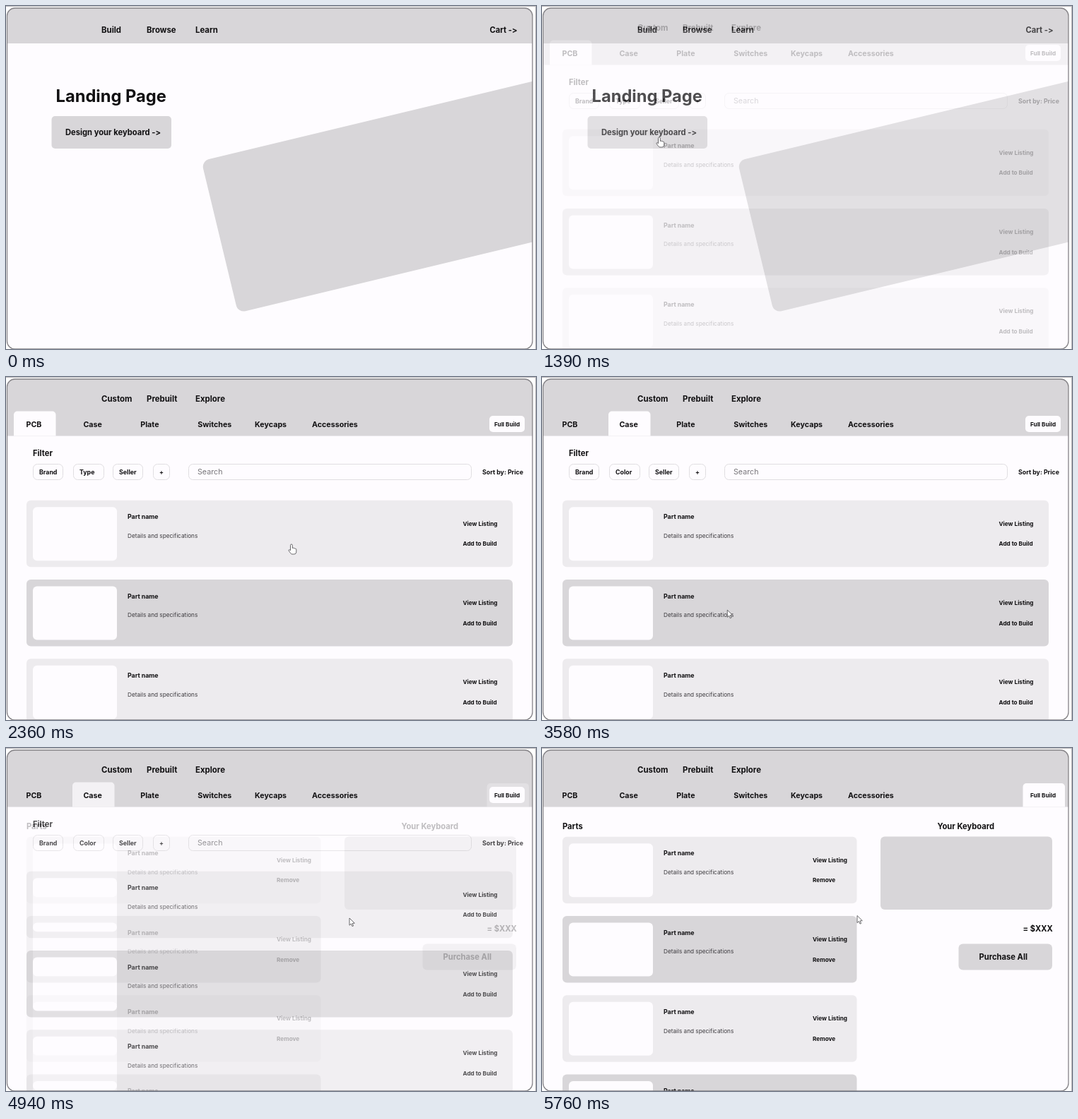
An HTML page with a canvas for the animation above (5850 ms loop, 750 by 486 pixels).

```html
<!DOCTYPE html>
<html lang="en">
<head>
<meta charset="utf-8">
<title>Keyboard builder wireframe</title>
<style>
html, body { margin: 0; width: 100%; height: 100%; overflow: hidden; background: #fff; }
canvas { display: block; width: 750px; height: 486px; }
</style>
</head>
<body>
<canvas id="stage" width="750" height="486"></canvas>
<script>
const W = 750, H = 486, LOOP = 5850;
const PAPER = '#fefcff', GREY = '#d8d6d9', PALE = '#edebee', INK = '#111012';
const LARGE = 11.2, MEDIUM = 8.8, SMALL = 8.2;
const stage = document.getElementById('stage').getContext('2d');

function box(c, x, y, w, h, r, fill, line) {
  c.beginPath();
  c.roundRect(x, y, w, h, r);
  if (fill) { c.fillStyle = fill; c.fill(); }
  if (line) { c.strokeStyle = line; c.lineWidth = 1; c.stroke(); }
}

function text(c, str, x, y, size = LARGE, weight = 700, color = INK) {
  c.font = `${weight} ${size}px Inter, sans-serif`;
  c.fillStyle = color;
  // Drawing ">" on its own keeps "->" from turning into an arrow ligature.
  const arrow = str.endsWith('->');
  const main = arrow ? str.slice(0, -1) : str;
  c.fillText(main, x, y);
  if (arrow) c.fillText('>', x + c.measureText(main).width, y);
}

function outline(c) {
  c.beginPath();
  c.roundRect(1.5, 3, 743.5, 483, 11);
}

function makePage(draw) {
  const canvas = document.createElement('canvas');
  canvas.width = W;
  canvas.height = H;
  const c = canvas.getContext('2d');
  box(c, 0, 0, W, H, 0, '#b9b7ba');
  box(c, 0, 1, W - 1, H - 1, 0, '#fff');
  c.save();
  outline(c);
  c.clip();
  box(c, 0, 0, W, H, 0, PAPER);
  draw(c);
  c.restore();
  outline(c);
  c.strokeStyle = '#858387';
  c.lineWidth = 1.3;
  c.stroke();
  return canvas;
}

function nav(c, names, y) {
  names.forEach((name, i) => text(c, name, 135 + i * 64 + (i === 2 ? 5 : 0), y, 11.4));
}

function landing(c) {
  box(c, 0, 0, W, 53, 0, GREY);
  nav(c, ['Build', 'Browse', 'Learn'], 37.5);
  text(c, 'Cart ->', 684.5, 37.5);
  text(c, 'Landing Page', 70.5, 136, 23.7);
  box(c, 64.5, 156, 169.5, 46, 5, GREY);
  text(c, 'Design your keyboard ->', 84, 183);
  c.save();
  c.translate(276.5, 219.7);
  c.rotate(-Math.atan(0.241));
  box(c, 0, 0, 620, 221.3, 11, GREY);
  c.restore();
}

function header(c, tabX, tabY = 48.5) {
  box(c, 0, 0, W, 83.5, 0, GREY);
  box(c, tabX, tabY, 59.5, 83.5 - tabY, [5, 5, 0, 0], PAPER);
  box(c, 684, 55, 50, 23, 5, PAPER);
  nav(c, ['Custom', 'Prebuilt', 'Explore'], 35);
  ['PCB', 'Case', 'Plate', 'Switches', 'Keycaps', 'Accessories']
    .forEach((name, i) => text(c, name, 28.5 + i * 80.9, 71, 10.7));
  text(c, 'Full Build', 691, 70, SMALL);
}

function rows(c, top, width, linkX, action) {
  for (let i = 0; i < 4; i++) {
    const y = top + i * 112.3;
    box(c, 29, y, width, 94.5, 6, i % 2 ? GREY : PALE);
    box(c, 38, y + 9.5, 119, 76, 6, PAPER);
    text(c, 'Part name', 172, y + 26.5, MEDIUM);
    text(c, 'Details and specifications', 172, y + 53.3, SMALL, 400, '#3c3a3e');
    text(c, 'View Listing', linkX, y + 36, SMALL);
    text(c, action, linkX, y + 64.7, SMALL);
  }
}

function chip(c, name, x, w) {
  box(c, x, 123.5, w, 22, 6, PAPER, '#e0dee1');
  text(c, name, x + 8.5, 138, MEDIUM);
}

function parts(c, tabX, secondFilter) {
  header(c, tabX);
  text(c, 'Filter', 38, 112);
  chip(c, 'Brand', 38.5, 42);
  chip(c, secondFilter, 95.5, 43);
  chip(c, 'Seller', 151.5, 42);
  chip(c, '+', 208.5, 23);
  chip(c, '', 258.5, 400);
  text(c, 'Search', 271, 138.2, 10.7, 400, '#777579');
  text(c, 'Sort by: Price', 674, 137.7, MEDIUM);
  rows(c, 174.7, 688, 646.5, 'Add to Build');
}

function fullBuild(c) {
  header(c, 680.5, 50);
  text(c, 'Parts', 29, 114.5);
  rows(c, 125.7, 416.5, 383, 'Remove');
  text(c, 'Your Keyboard', 559.5, 114.5);
  box(c, 479, 125.5, 243, 103.5, 6, GREY);
  text(c, '= $XXX', 680.5, 260);
  box(c, 589.5, 277.5, 132.5, 37, 6, GREY);
  text(c, 'Purchase All', 618.5, 300);
}

// Each page dissolves in over the one before, from its start time.
const pages = [
  { start: 0, image: makePage(landing) },
  { start: 1390, image: makePage(c => parts(c, 11, 'Type')) },
  { start: 2850, image: makePage(c => parts(c, 94, 'Color')) },
  { start: 4940, image: makePage(fullBuild) }
];

const HAND = new Path2D('M-1.5 8.8V1.4a1.4 1.4 0 0 1 2.8 0V5.6c.4-.9 2-.7 2.1.4c.4-.8 1.8-.5 1.9.5c.5-.6 1.5-.2 1.5.8V10c0 2.8-1 4-3.2 4H.9C-.8 14-1.5 12.4-3.8 9.2c-.7-1 .5-2 1.3-1.2z');
const ARROW = new Path2D('M0 0V10.2L2.4 8L4 11.7L5.6 11L4.1 7.4L7.3 7.2Z');

// Pointer moves: start, end, where to, and how far the path sags
const moves = [
  [270, 700, 130, 203, 0],
  [700, 940, 166, 186, 0],
  [1700, 1850, 177, 217.5, 0],
  [1850, 2360, 404, 237, 35],
  [2960, 3420, 272, 304, 0],
  [3420, 3580, 262, 330, 0],
  [3580, 4030, 319, 342, 6],
  [4030, 4580, 486, 241, 0],
  [5360, 5760, 446, 237.5, -18]
];

function pointerAt(t) {
  let x = 714, y = 30;
  for (const [start, end, toX, toY, sag] of moves) {
    if (t < start) break;
    const k = 1 - (1 - Math.min(1, (t - start) / (end - start))) ** 2;
    x += (toX - x) * k;
    y += (toY - y) * k + sag * Math.sin(Math.PI * k);
  }
  return [x, y];
}

function drawPointer(c, t) {
  if (t < 270) return;
  const shape = t >= 620 && t < 2880 ? HAND : ARROW;
  c.save();
  c.translate(...pointerAt(t));
  c.fillStyle = '#fff';
  c.strokeStyle = '#59575b';
  c.lineWidth = 0.9;
  c.lineJoin = 'round';
  c.fill(shape);
  c.stroke(shape);
  c.restore();
}

function frame() {
  const t = performance.now() % LOOP;
  for (const { start, image } of pages) {
    if (t < start) break;
    const k = Math.min(1, (t - start + 50) / 310);
    stage.globalAlpha = start ? 1 - (1 - k) ** 1.7 : 1;
    stage.drawImage(image, 0, 0);
  }
  stage.globalAlpha = 1;
  drawPointer(stage, t);
  requestAnimationFrame(frame);
}
frame();
</script>
</body>
</html>
```
